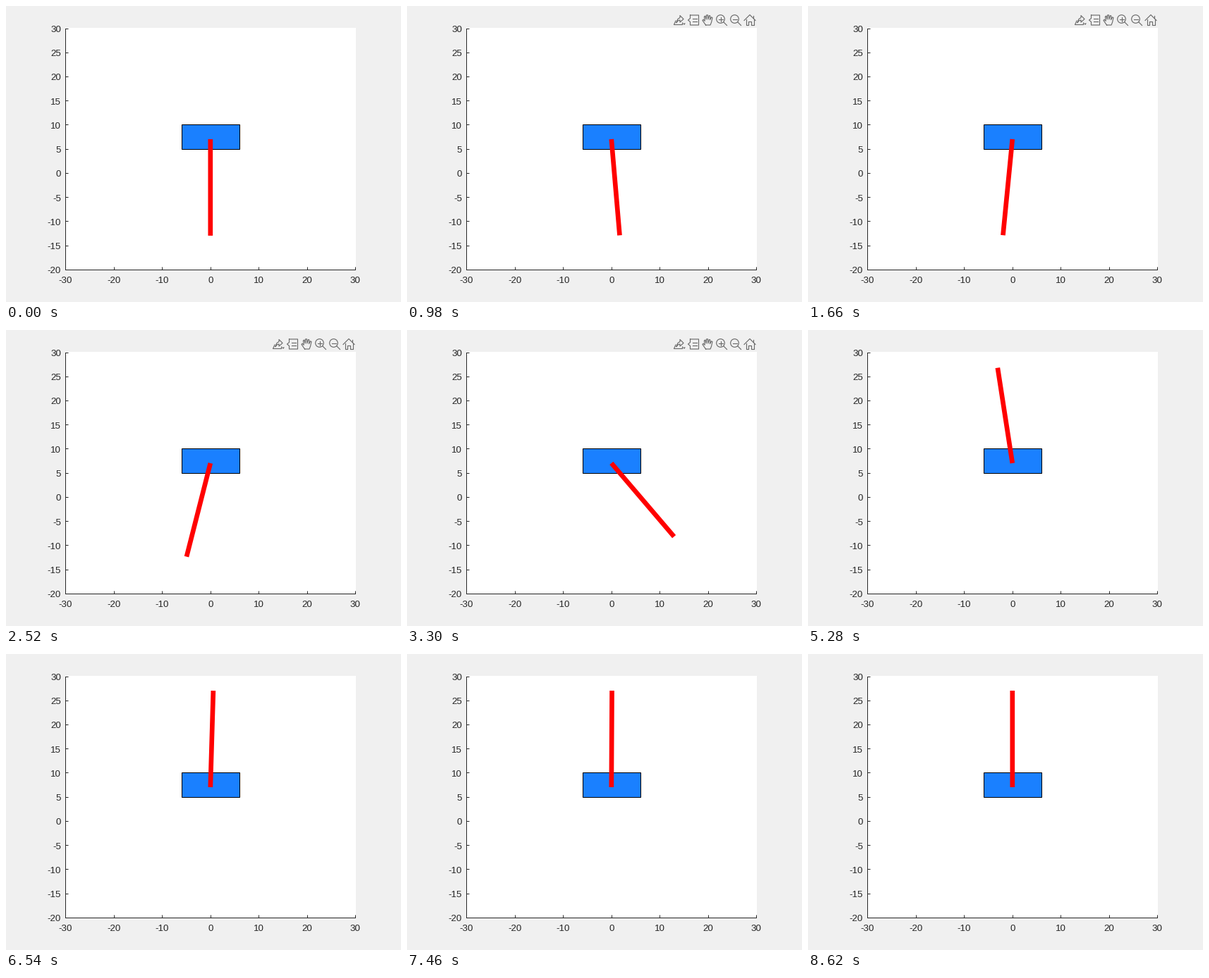
Recreate the animation shown at these times as a matplotlib script. Size 560 by 420 pixels, loop 8.64 s.

```python
import numpy as np
import matplotlib.pyplot as plt
from matplotlib.animation import FuncAnimation
from matplotlib.patches import Circle, Rectangle

W, H, DPI = 560, 420, 100
FRAMES, STEP = 432, 20
PX = 72 / DPI                      # one pixel in points
UNIT = 6.846                       # pixels per data unit
INK, ICON = "#262626", "#6a6a6a"

START = 520                        # ms, the rod leaves its rest
CATCH = 4200                       # ms, last moment of the growing swing
TOOLBAR = (700, 4500)              # ms, shown between these times

# rod angle in degrees after the swing-up, 180 is upright
CATCH_T = [4300, 4400, 4500, 4600, 4700, 4800, 4900, 5040, 5160, 5280,
           5530, 5780, 6040, 6300, 6540, 6680, 7100, 7560, 8100, 8640]
CATCH_A = [10, 52, 90, 122, 148, 167, 180, 190.2, 190.0, 188.8,
           184.2, 180.6, 178.7, 178.1, 178.3, 178.6, 179.3, 179.75, 179.92, 180]


def px(x, y):
    return 289.8 + UNIT * x, 373.8 - UNIT * (y + 20)


def swing(t):
    """Oscillation that grows by a constant ratio each half period."""
    half, peak = 630, 3360
    k, w = 0.465 / half, np.pi / half
    s = t - peak
    return 42.3 * np.exp(k * s) * (np.cos(w * s) - k / w * np.sin(w * s))


KEY_T = np.array([CATCH - 60, CATCH] + CATCH_T, float)
KEY_A = np.array([swing(CATCH - 60), swing(CATCH)] + CATCH_A)
SLOPE = np.gradient(KEY_A, KEY_T)


def hermite(t):
    i = min(np.searchsorted(KEY_T, t, side="right") - 1, len(KEY_T) - 2)
    d = KEY_T[i + 1] - KEY_T[i]
    u = (t - KEY_T[i]) / d
    a, b = KEY_A[i], KEY_A[i + 1]
    ease = u * u * (3 - 2 * u)
    return (a + (b - a) * ease
            + d * u * (1 - u) ** 2 * SLOPE[i]
            - d * u * u * (1 - u) * SLOPE[i + 1])


def angle(t):
    if t < START:
        return 0.0
    return swing(t) if t <= CATCH else hermite(t)


plt.rcParams["font.family"] = "Liberation Sans"
fig = plt.figure(figsize=(W / DPI, H / DPI), dpi=DPI, facecolor="#f0f0f0")
ax = fig.add_axes([0, 0, 1, 1])
ax.set_xlim(0, W)
ax.set_ylim(H, 0)
ax.axis("off")


def stroke(points, color=INK, width=1, **kw):
    xs, ys = zip(*points)
    line, = ax.plot(xs, ys, color=color, lw=width * PX, **kw)
    return line


def label(x, y, value, align):
    ax.text(x, y, str(value), size=13.33 * PX, color=INK, ha=align, va="baseline")


def draw_axes():
    left, top = px(-30, 30)
    right, bottom = px(30, -20)
    ax.add_patch(Rectangle((84, 31), 412, 343, fc="white", ec="none"))
    for x in range(-30, 31, 10):
        tx = px(x, 0)[0]
        stroke([(tx, bottom), (tx, bottom - 4)], solid_capstyle="butt")
        label(tx, 393, x, "center")
    for y in range(-20, 31, 5):
        ty = px(0, y)[1]
        stroke([(left, ty), (left + 4, ty)], solid_capstyle="butt")
        label(78, ty + 5.4, y, "right")
    stroke([(left, top), (left, bottom)])
    stroke([(left, bottom), (right, bottom)])


def draw_toolbar():
    parts = []

    def pen(points, cx, **kw):
        parts.append(stroke([(cx + x, 20 + y) for x, y in points], ICON, 1.15, **kw))

    def ring(cx, cy, r):
        parts.append(ax.add_patch(Circle((cx, cy), r, fill=False, ec=ICON, lw=1.15 * PX)))

    # export
    pen([(-5, 1), (-7.5, 6.5), (4.5, 6.5), (4.5, 4)], 386)
    pen([(-4, 3.5), (-2, -1.5), (1, -3.5), (1, -6.5), (6, -1.5), (1, 3),
         (1, 0), (-2, 1), (-4, 3.5)], 386)
    parts.extend(ax.fill([391, 395, 393], [24.5, 24.5, 27], color=ICON, lw=0))
    # data tip
    pen([(-4.5, -7), (7.5, -7), (7.5, 7), (-4.5, 7), (-4.5, 2.5), (-7.5, 0),
         (-4.5, -2.5), (-4.5, -7)], 406)
    pen([(-1.5, -2), (4.5, -2)], 406)
    pen([(-1.5, 2), (4.5, 2)], 406)
    # pan hand
    pen([(-2.5, 7), (-7, 0.5), (-6, -0.8), (-3.8, 1.3), (-4.6, -5), (-3.2, -5.8),
         (-1.8, -1), (-1.5, -7), (0.3, -7.3), (0.8, -1), (2.4, -6.5), (3.8, -6),
         (3.5, -0.5), (5.6, -4.2), (6.9, -3.4), (5.6, 3), (4, 7), (-2.5, 7)], 426)
    # zoom in and out
    for cx in (446, 466):
        ring(cx - 1.5, 18.5, 5.8)
        pen([(2.8, 2.8), (7.5, 7.5)], cx)
        pen([(-4.5, -1.5), (1.5, -1.5)], cx)
    pen([(-1.5, -4.5), (-1.5, 1.5)], 446)
    # home
    pen([(-8, 0.5), (0, -7.5), (8, 0.5)], 486)
    pen([(-5.5, -1.5), (-5.5, 7), (-2, 7), (-2, 1.5), (2, 1.5), (2, 7),
         (5.5, 7), (5.5, -1.5)], 486)
    pen([(4.5, -3), (4.5, -6.5)], 486)
    return parts


draw_axes()
toolbar = draw_toolbar()
bx, by = px(-6, 10)
ax.add_patch(Rectangle((bx, by), 12 * UNIT, 5 * UNIT, fc="#1a80ff", ec="black",
                       lw=PX, zorder=3))
rod = stroke([px(0, 7), px(0, -13)], "red", 6.67, solid_capstyle="butt",
             zorder=4, snap=False)


def update(i):
    t = i * STEP
    a = np.radians(angle(t))
    (x0, y0), (x1, y1) = px(0, 7), px(20 * np.sin(a), 7 - 20 * np.cos(a))
    rod.set_data([x0, x1], [y0, y1])
    shown = TOOLBAR[0] <= t < TOOLBAR[1]
    for part in toolbar:
        part.set_visible(shown)
    return [rod, *toolbar]


anim = FuncAnimation(fig, update, frames=FRAMES, interval=STEP, repeat=True,
                     repeat_delay=0, blit=False)
plt.show()
```
